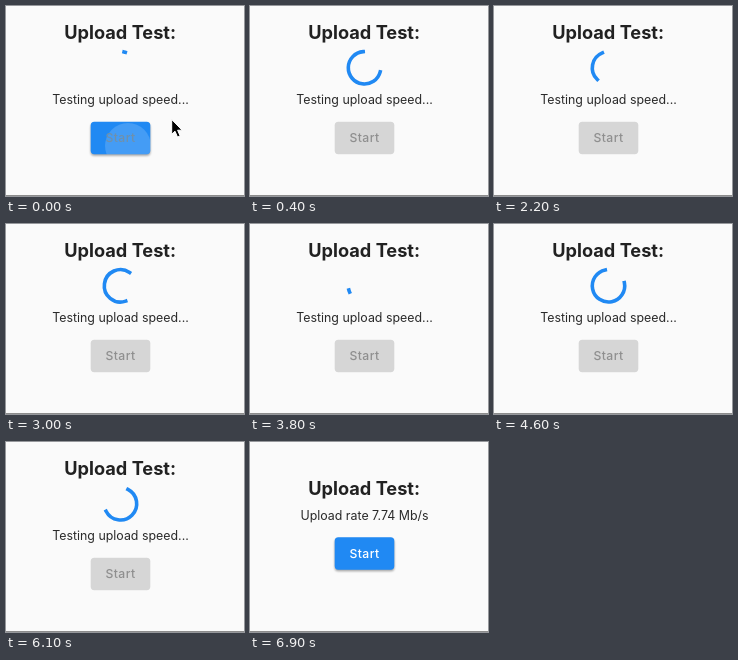
Recreate the animation shown at these times as an HTML page. Size 238 by 190 pixels, loop 7.5 s.

```html
<!DOCTYPE html>
<html lang="en">
<head>
<meta charset="utf-8">
<title>Upload Test</title>
<style>
  html, body { margin: 0; width: 100%; height: 100%; overflow: hidden; background: #fafafa; }
  svg { display: block; width: 238px; height: 190px; }
  text { font-family: Inter, Roboto, sans-serif; text-anchor: middle; }
  #title { font-size: 18.2px; font-weight: 700; fill: #212121; }
  #status { font-size: 12.4px; fill: #2a2a2a; }
  #label { font-size: 12.2px; font-weight: 500; letter-spacing: .4px; }
  #spinner { fill: none; stroke: #2089f3; stroke-width: 3.6; stroke-linecap: square; }
</style>
</head>
<body>
<svg viewBox="0 0 238 190">
  <defs>
    <clipPath id="face"><rect x="84.7" y="115.8" width="59.6" height="32.4" rx="3.6"/></clipPath>
    <filter id="blur" x="-20%" y="-30%" width="140%" height="160%"><feGaussianBlur stdDeviation="1.2"/></filter>
  </defs>
  <rect width="238" height="190" fill="#fafafa"/>
  <rect y="189" width="238" height="1" fill="#8c8c8c"/>
  <text id="title" x="114.2" y="32.6">Upload Test:</text>
  <path id="spinner"/>
  <text id="status" x="114.5" y="98.4"></text>
  <g id="button">
    <rect id="shadow" x="84.7" y="117.4" width="59.6" height="32.4" rx="3.6" fill="#000" filter="url(#blur)"/>
    <rect id="fill" x="84.7" y="115.8" width="59.6" height="32.4" rx="3.6"/>
    <circle id="ripple" cx="122" cy="140" r="23" fill="#fff" clip-path="url(#face)"/>
    <text id="label" x="114.5" y="136.3">Start</text>
  </g>
  <path id="cursor" d="M0 0V14.8L3.3 11.7L5.8 17.6L8.4 16.4L5.9 10.7H10.4Z"
        fill="#000" stroke="#fff" stroke-width="1" stroke-linejoin="round"/>
</svg>
<script>
const LOOP = 7500, STEP = 100, DONE = 6300;
const SPIN_LEAD = 55, SWEEP_PERIOD = 1333, TURN_PERIOD = 2222;
const CENTER = { x: 114.5, y: 61.8 }, RADIUS = 16.2;
const BLUE = [32, 137, 243], GREY = [214, 214, 214];
const WHITE = [255, 255, 255], DIM = [143, 143, 143], FADING = [112, 144, 170];
const CURSOR = [[165.7, 113.5], [178, 118], [201, 126], [224, 131]];

const el = id => document.getElementById(id);
const set = (id, attrs) => {
  for (const name in attrs) el(id).setAttribute(name, attrs[name]);
};
const clamp = v => Math.min(1, Math.max(0, v));
const mix = (a, b, k) => `rgb(${a.map((v, i) => Math.round(v + (b[i] - v) * k))})`;

// cubic-bezier(.4, 0, .2, 1), solved by bisection
function ease(x) {
  if (x <= 0 || x >= 1) return clamp(x);
  let lo = 0, hi = 1;
  for (let i = 0; i < 24; i++) {
    const u = (lo + hi) / 2, v = 1 - u;
    if (1.2 * u * v * v + 0.6 * u * u * v + u ** 3 < x) lo = u; else hi = u;
  }
  return 3 * lo * lo * (1 - lo) + lo ** 3;
}

function arcPath(time) {
  const phase = time / SWEEP_PERIOD % 1;
  const head = ease(phase * 2), tail = ease(phase * 2 - 1);
  const start = tail * 270 + time / TURN_PERIOD * 360 + phase * 90 - 90;
  const sweep = Math.max((head - tail) * 270, 0.1);
  const point = deg => {
    const a = deg * Math.PI / 180;
    return `${CENTER.x + RADIUS * Math.cos(a)} ${CENTER.y + RADIUS * Math.sin(a)}`;
  };
  return `M${point(start)}A${RADIUS} ${RADIUS} 0 ${+(sweep > 180)} 1 ${point(start + sweep)}`;
}

function render(time) {
  const t = Math.floor(time / STEP) * STEP;
  const done = t >= DONE;
  const shift = done ? 20.5 : 0;
  const active = done ? clamp(0.6 + (t - DONE) / 250) : clamp(1 - t / 190);

  set('title', { transform: `translate(0 ${shift})` });
  set('status', { transform: `translate(0 ${-shift})` });
  set('button', { transform: `translate(0 ${-shift})` });
  el('status').textContent = done ? 'Upload rate 7.74 Mb/s' : 'Testing upload speed...';

  set('spinner', { d: done ? '' : arcPath(t + SPIN_LEAD) });
  set('fill', { fill: mix(GREY, BLUE, active) });
  set('shadow', { opacity: 0.35 * active });
  set('label', { fill: mix(DIM, done ? WHITE : FADING, active) });
  set('ripple', { opacity: done ? 0 : 0.16 * active });

  const spot = CURSOR[t / STEP];
  set('cursor', spot
    ? { visibility: 'visible', transform: `translate(${spot})` }
    : { visibility: 'hidden' });
}

function tick() {
  render(performance.now() % LOOP);
  requestAnimationFrame(tick);
}
tick();
</script>
</body>
</html>
```
